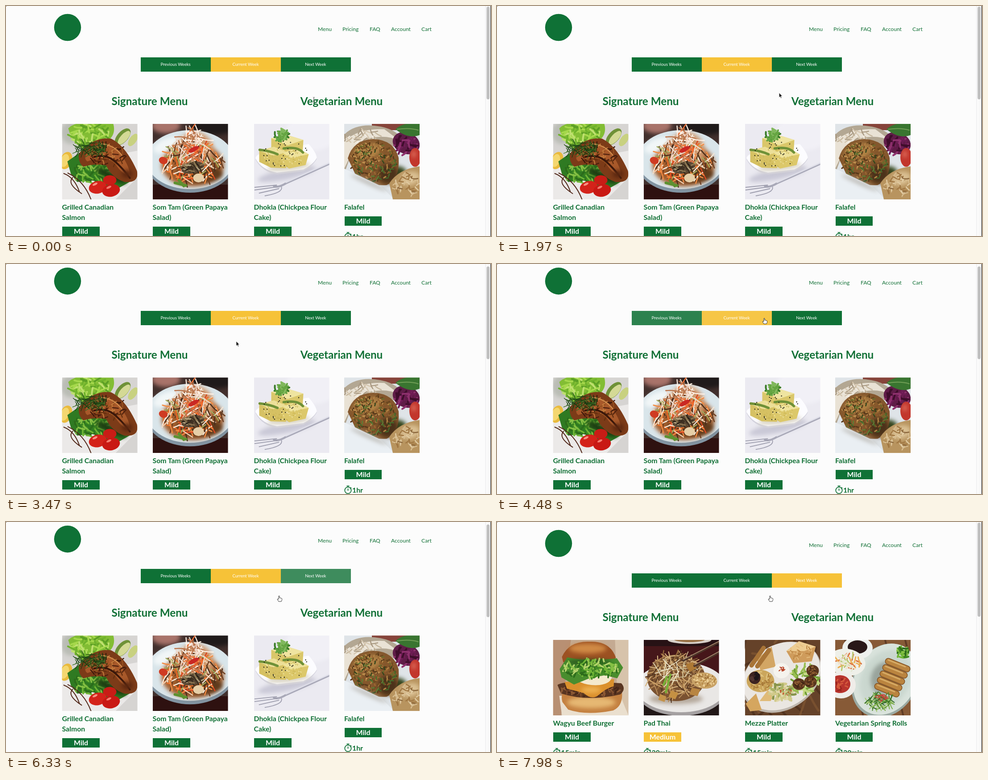
An HTML page for the animation above (8000 ms loop, 1087 by 515 pixels).

```html
<!DOCTYPE html>
<html lang="en">
<head>
<meta charset="utf-8">
<title>Weekly menu</title>
<style>
html, body { margin: 0; width: 100%; height: 100%; overflow: hidden; background: #fcfcfc; }
svg { display: block; }
rect { shape-rendering: crispEdges; }
text { font-family: Lato, sans-serif; fill: #0f6f34; }
.nav { font-size: 12.1px; }
.tab { font-size: 9.65px; fill: #fff; text-anchor: middle; }
.h2 { font-size: 24.25px; font-weight: 700; text-anchor: middle; }
.name { font-size: 15.8px; font-weight: 700; }
.level { font-size: 15.9px; font-weight: 700; fill: #fff; text-anchor: middle; }
.soft { filter: blur(5px); }
.photo { filter: blur(.45px); }
</style>
</head>
<body>
<svg id="stage" width="1087" height="515" viewBox="0 0 1087 515"></svg>
<script>
const GREEN = '#0f7136', YELLOW = '#f6c238';

let seed = 7;
const rnd = () => (seed = (seed * 16807) % 2147483647) / 2147483647;
const pick = list => list[Math.floor(rnd() * list.length)];

const rect = (x, y, w, h, fill) => `<rect x="${x}" y="${y}" width="${w}" height="${h}" fill="${fill}"/>`;
const oval = (x, y, rx, ry, fill, turn = 0) =>
  `<ellipse cx="${x}" cy="${y}" rx="${rx}" ry="${ry}" fill="${fill}" transform="rotate(${turn} ${x} ${y})"/>`;
const soft = (...args) => `<g class="soft">${oval(...args)}</g>`;
const shape = (d, fill) => `<path d="${d}" fill="${fill}"/>`;
const line = (d, color, width) =>
  `<path d="${d}" fill="none" stroke="${color}" stroke-width="${width}" stroke-linecap="round"/>`;
const label = (cls, x, y, s) => `<text class="${cls}" x="${x}" y="${y}">${s}</text>`;

// Curved strokes scattered inside an ellipse
function strands(n, x, y, rx, ry, colors, len, width) {
  let out = '';
  for (let i = 0; i < n; i++) {
    const a = rnd() * 6.283, r = Math.sqrt(rnd()), b = rnd() * 6.283;
    const dx = Math.cos(b) * len / 2, dy = Math.sin(b) * len / 2, bend = (rnd() - 0.5) * len * 0.6;
    const cx = x + Math.cos(a) * r * rx, cy = y + Math.sin(a) * r * ry;
    out += line(`M${(cx - dx).toFixed(1)} ${(cy - dy).toFixed(1)}q${(dx - dy / len * bend).toFixed(1)} ` +
      `${(dy + dx / len * bend).toFixed(1)} ${(2 * dx).toFixed(1)} ${(2 * dy).toFixed(1)}`, pick(colors), width);
  }
  return out;
}

const LEAF = ['#3f8a22', '#6fb536', '#2c6b1b', '#86c045'];
const CRUST = ['#8a5a2a', '#b08243', '#6d4a20', '#6c6a2c', '#9a6632', '#57391b'];

const photos = {
  salmon: () => rect(0, 0, 169, 169, '#d6d4d2') + shape('M0 92L0 169L120 169L169 120V60Z', '#ebe9e8') +
    soft(20, 20, 22, 25, '#b9bcb4') + shape('M14 10Q30-6 60 0H115Q122 25 100 40L60 60Q25 52 14 10Z', '#82bd34') +
    strands(50, 62, 25, 42, 24, ['#a6d84c', '#6fb22c', '#bfe070', '#5c9f25'], 16, 4) +
    oval(136, 29, 23, 12, '#6f9137', -48) + oval(139, 31, 19, 8, '#d4d995', -48) +
    oval(159, 36, 16, 8, '#c8d180', -55) + oval(9, 82, 13, 20, '#e9ba3c', 20) + oval(6, 82, 9, 15, '#f4d770', 20) +
    shape('M12 84L46 60L120 100L155 128L116 150L75 126L34 130L20 112Z', '#2f7a22') +
    strands(80, 74, 109, 50, 23, LEAF, 14, 3.5) + soft(110, 116, 38, 9, '#1c3b12', 25) +
    shape('M38 66Q70 28 110 33Q143 49 168 105Q174 133 140 130Q112 121 99 93Q72 88 48 96Q35 86 38 66Z', '#7c3b18') +
    shape('M69 50Q98 36 124 59Q153 92 152 117Q133 114 115 82Q91 70 57 84Q43 75 69 50Z', '#a8592a') +
    strands(45, 102, 70, 46, 24, ['#4d200e', '#bf773a', '#63300f', '#96501f', '#3c190b'], 13, 2.4) +
    line('M72 74Q100 66 121 86T152 121', '#3a170a', 4) + line('M82 45Q112 43 134 70', '#d08b4c', 2.5) +
    soft(146, 112, 12, 9, '#5a2710') +
    strands(60, 64, 57, 35, 16, ['#244f1a', '#3a6c24', '#183d12'], 20, 1.3) +
    line('M4 111Q28 120 39 152M13 110Q49 127 65 169M24 120Q10 134 44 156', '#52291b', 2) +
    oval(107, 126, 15, 11, '#c81d16') + oval(80, 142, 20, 14, '#d4231a', -12) + oval(110, 149, 20, 14, '#c91914', -12) +
    oval(74, 135, 6, 2.5, '#f79282', -25) + oval(105, 142, 6, 2.5, '#f47e70', -25),

  papaya: () => rect(0, 0, 169, 169, '#42302d') + soft(30, 4, 32, 17, '#a8736a') + soft(135, 8, 50, 17, '#1f1a1a') +
    rect(0, 136, 169, 33, '#2e1110') + oval(84, 86, 99, 68, '#8294a2') + oval(84, 80, 98, 66, '#d9e5ea') +
    soft(30, 48, 30, 14, '#f1f6f7', -25) + soft(90, 92, 70, 48, '#a4602f') + soft(95, 60, 42, 42, '#cf9a70') +
    soft(105, 112, 52, 20, '#5e3a1c') +
    strands(130, 88, 86, 66, 44, ['#ee6c25', '#f3e6d6', '#d94721', '#f0cdae', '#6f4124', '#f18a42', '#a0a95c', '#4c2e1c'], 27, 2.6) +
    strands(50, 88, 46, 34, 36, ['#fff1e5', '#f1d7ca', '#ef6d31', '#e9dccd', '#b9744c'], 34, 2.4) +
    oval(90, 98, 26, 13, '#5c4a36', -12) + strands(26, 90, 98, 22, 10, ['#3e3021', '#8c7751', '#b3a380', '#2a2118'], 12, 3) +
    oval(92, 57, 13, 5, '#c92824', -28) + oval(24, 82, 10, 8, '#cf3b23', 20) + oval(103, 121, 12, 10, '#e6cfa8') +
    line('M50 132L75 138M59 126L70 139', '#5d9130', 6),

  dhokla: () => rect(0, 0, 169, 169, '#ebeaf1') + soft(130, 20, 60, 40, '#f1f0f6') +
    soft(74, 112, 66, 12, '#c9c8d6', -12) +
    shape('M4 80Q2 74 18 66L123 47Q140 66 141 78Q134 92 111 106L52 113Q18 107 4 80Z', '#d3d2dd') +
    shape('M4 78Q2 72 18 64L123 45Q140 64 141 76Q134 90 111 102L52 109Q18 103 4 78Z', '#fcfcff') +
    soft(78, 96, 48, 8, '#d8d2c0', -6) +
    shape('M39 32L72 24L111 36L109 70L70 75L39 64Z', '#dac76a') + shape('M39 32L72 24L111 36L76 48Z', '#efe4a0') +
    shape('M12 60L45 51L76 64L72 99L38 98L12 85Z', '#d6c163') + shape('M12 60L45 51L76 64L42 71Z', '#ecdf98') +
    shape('M64 65L98 54L123 68L116 92L79 100L64 90Z', '#dcc86a') + shape('M64 65L98 54L123 68L83 76Z', '#efe39c') +
    strands(80, 66, 75, 48, 22, ['#c9b350', '#eee2a2', '#cdb95e'], 2.5, 1.6) +
    line('M13 58Q35 60 53 68M67 55Q98 50 110 64', '#6f9138', 5.5) +
    strands(32, 61, 25, 15, 13, ['#397b28', '#65a542', '#80b85c'], 9, 4) +
    strands(32, 68, 65, 52, 32, ['#2b2a1d'], 0.5, 2.2) +
    line('M170 89L72 133Q54 144 45 139', '#a9a9b8', 4.5) + line('M170 87L72 131', '#dedee8', 2.5) +
    line('M51 137L2 142M52 141L2 148M56 145L12 155M62 141Q66 154 25 161', '#9c9cac', 1.8),

  falafel: () => rect(0, 0, 169, 169, '#dfe4e8') + rect(62, 0, 107, 14, '#86443a') +
    shape('M0 24Q28-4 82 6Q123 14 135 43L111 51L70 33L28 46L10 84L0 111Z', '#b3a793') +
    shape('M0 40Q30 9 90 12L125 38Q85 19 36 39L17 65L0 100Z', '#e9e2d5') +
    strands(30, 42, 29, 44, 15, ['#d5c6af', '#f3ede2', '#a99982', '#c4b59c'], 15, 2.4) +
    oval(139, 43, 31, 24, '#5f1c47', 20) + strands(30, 140, 46, 25, 20, ['#8f316e', '#3f0d2b', '#6d1c54'], 16, 4) +
    shape('M115 12Q133-5 169 0V25Q144 35 115 12Z', '#397530') + line('M119 12Q147 8 166 14', '#72a057', 2) +
    oval(159, 75, 13, 21, '#c2362c') + soft(156, 68, 4, 8, '#e27a68') + soft(121, 108, 18, 13, '#35481f') +
    shape('M8 77Q20 35 66 34Q112 36 122 76Q125 124 95 137Q49 140 25 113Z', '#84572d') +
    soft(52, 62, 34, 17, '#ad8044', -15) + soft(98, 112, 22, 22, '#4b321a') +
    strands(230, 65, 84, 51, 45, CRUST, 5, 3) + strands(40, 71, 86, 46, 42, ['#426a2b', '#5d7c36', '#34471d'], 6, 2.6) +
    strands(40, 55, 70, 40, 28, ['#c99a58', '#bb8c4c'], 3, 2) +
    shape('M0 100Q47 122 82 139L112 169H0Z', '#eaeff3') + soft(55, 132, 45, 4, '#b9b7b2', 24) +
    shape('M101 133Q122 101 169 95V169H109Z', '#b8945f') + soft(148, 122, 22, 15, '#d9bf92', -15) +
    strands(45, 140, 138, 28, 27, ['#d7bc8f', '#a17844', '#e0caa2', '#8d693e'], 10, 2.6),

  burger: () => rect(0, 0, 169, 169, '#c4aa92') + shape('M0 0H40L18 169H0Z', '#b89073') + shape('M139 0H169V169H146Z', '#d7c3ab') +
    shape('M20 169L14 125L150 123L169 169Z', '#eadfce') +
    shape('M20 38Q36 2 82 4Q128 2 141 40L120 56Q81 61 23 50Z', '#9c5122') + soft(78, 19, 42, 11, '#d08a45') +
    shape('M21 139Q16 120 28 111L154 112Q159 147 135 158Q75 170 34 156Z', '#c48040') + soft(86, 140, 54, 13, '#e6b873') +
    shape('M10 101Q25 89 153 97Q165 110 151 122Q78 139 18 120Z', '#593521') +
    strands(75, 83, 112, 66, 13, ['#79482c', '#432417', '#8e5a35'], 7, 3) +
    shape('M26 94L137 88L136 104Q118 109 104 122Q88 137 69 119L31 109Z', '#db902c') + soft(85, 112, 22, 7, '#eeb252') +
    shape('M43 85Q85 66 132 80Q132 97 105 101Q80 103 62 95Z', '#f4e9cc') +
    shape('M15 65L32 39Q80 50 143 41L157 62L144 86L117 79L84 85L47 100L19 84Z', '#498d2e') +
    soft(80, 50, 50, 6, '#28531c') + strands(115, 85, 64, 63, 19, [...LEAF, '#b6d36e'], 11, 3.5),

  padThai: () => rect(0, 0, 169, 169, '#46171a') + rect(0, 0, 169, 14, '#271215') +
    oval(103, 0, 49, 9, '#d8d0c8') + oval(103, -2, 36, 7, '#997146') + rect(0, 138, 169, 31, '#211717') +
    oval(84, 112, 101, 58, '#a4a0a1') + oval(84, 106, 101, 56, '#e9e7e5') + soft(73, 132, 60, 12, '#b5a99c') +
    oval(73, 85, 65, 52, '#7a5231') +
    strands(165, 70, 80, 60, 46, ['#b58a59', '#7d5431', '#d6b581', '#9b703f', '#543621', '#cda368'], 30, 2.2) +
    strands(22, 60, 62, 46, 31, ['#e5ddbd', '#c9b98f', '#f0e9cd'], 33, 1.8) +
    oval(136, 91, 29, 18, '#c8a267', 5) + strands(90, 136, 91, 26, 15, ['#d9b776', '#b98b47', '#edcf96', '#9f723b'], 2, 3) +
    shape('M62 113L78 119L71 133L56 127Z', '#c59143') + shape('M94 55L110 50L119 64L103 71Z', '#ad7935') +
    shape('M108 107L127 111L121 126L103 122Z', '#b88542') + shape('M37 121L51 127L47 139L33 134Z', '#c49248') +
    line('M50 117L60 78M45 100L52 83', '#78ad37', 5) +
    line('M89 46L169 5M114 58L169 28', '#4d3529', 5) + line('M89 44L169 3M114 56L169 26', '#aa8c72', 1.5),

  mezze: () => rect(0, 0, 169, 169, '#654229') + strands(35, 85, 80, 105, 104, ['#78502f', '#51331f'], 45, 5) +
    oval(82, 84, 95, 72, '#bfb7ae', -32) + oval(82, 81, 92, 70, '#eae6e1', -32) +
    shape('M27 43L60 15L69 60L35 68Z', '#d3a664') + line('M15 57L42 18M28 59L54 23', '#a87437', 10) +
    shape('M93 25L121 3L159 15L150 48L109 52Z', '#cf9c5c') + shape('M93 25L121 3L159 15L133 25Z', '#edcc92') +
    strands(24, 126, 27, 24, 17, ['#b77e3c', '#e5bd7f'], 7, 2) +
    oval(35, 92, 31, 25, '#cba65c') + strands(55, 35, 92, 26, 21, ['#b98d45', '#e0c481', '#a77a39'], 6, 2.5) +
    oval(22, 85, 13, 14, '#3d2421') + strands(7, 22, 84, 9, 9, ['#523631', '#1f1719'], 3, 7) +
    shape('M2 143L25 120L38 157L12 160Z', '#d5a65f') + shape('M33 137L51 113L67 119L58 137Z', '#e0bb78') +
    oval(82, 69, 18, 17, '#f5f3ed') + strands(15, 82, 65, 7, 5, ['#b94428'], 3, 2) +
    strands(70, 85, 116, 29, 20, ['#d1ca8a', '#aab266', '#e0d8a9', '#87944b'], 9, 5) +
    strands(12, 91, 116, 15, 8, ['#c24d28'], 2, 2) +
    strands(60, 133, 88, 31, 30, ['#99be52', '#c6d983', '#719e35'], 15, 4) +
    [[152, 69], [121, 99], [147, 94]].map(([x, y]) =>
      oval(x, y, 14, 13, '#59351e') + strands(24, x, y, 11, 10, ['#7a4b27', '#402614', '#936235'], 3, 2.5)).join(''),

  rolls: () => rect(0, 0, 169, 169, '#875a37') +
    [20, 65, 110, 155].map(x => line(`M${x} -8L${x + 45} 180`, '#5e3b24', 4)).join('') +
    oval(112, 91, 71, 87, '#9baaa3', 32) + oval(113, 88, 68, 84, '#d9e3dc', 32) + soft(113, 88, 54, 69, '#cad7cf', 32) +
    oval(50, 18, 34, 25, '#edf0ed') + oval(50, 16, 22, 15, '#281818') +
    oval(26, 50, 42, 30, '#eff0e9', 10) + strands(40, 29, 49, 27, 16, ['#edae53', '#f0e2cd', '#b8c76f', '#db7240', '#e6e9d4'], 13, 3) +
    oval(13, 101, 33, 30, '#f0ede9') + oval(11, 99, 23, 20, '#b8342d') +
    strands(22, 11, 99, 17, 14, ['#d65b3c', '#9b251f'], 6, 3) +
    strands(30, 153, 29, 13, 12, LEAF, 9, 4) + soft(112, 86, 32, 38, '#99a49c', 20) +
    [0, 1, 2, 3, 4].map(i => {
      const x = 119 - i * 6, y = 48 + i * 14;
      const d = `M${x} ${y}L${x + 42} ${y + 17}`;
      return line(d, '#815022', 15) + line(d, '#ba843f', 12) + line(`M${x} ${y - 3}L${x + 38} ${y + 12}`, '#d5aa65', 3);
    }).join('') +
    strands(65, 102, 138, 29, 15, ['#51892d', '#7cad4b', '#a5c875', '#316a27'], 18, 2) +
    strands(14, 103, 130, 14, 8, ['#c5463b'], 8, 2)
};

const COLUMNS = [125.5, 328.5, 555.5, 758];

function stopwatch(x, y) {
  return `<g transform="translate(${x} ${y})" fill="none" stroke="${GREEN}" stroke-width="1.7">
    <circle cx="8.5" cy="10.5" r="7.2"/><path d="M5.5 1H11.5M8.5 1V4M8.5 6.5V11.5M14 4L16 6"/></g>`;
}

function dish(column, [photo, name, level, time]) {
  const x = COLUMNS[column], lines = name.split('|'), top = 448.3 + lines.length * 22.7;
  return `<svg x="${x}" y="264" width="169" height="169"><g class="photo">${photos[photo]()}</g></svg>` +
    lines.map((s, i) => label('name', x, 456 + i * 22.7, s)).join('') +
    rect(x + 0.7, top, 83.5, 20.8, level === 'Mild' ? GREEN : YELLOW) + label('level', x + 42.5, top + 16.2, level) +
    stopwatch(x, top + 35) + label('name', x + 18, top + 50.5, time);
}

const menus = [
  [['salmon', 'Grilled Canadian|Salmon', 'Mild', '30min'], ['papaya', 'Som Tam (Green Papaya|Salad)', 'Mild', '30min'],
    ['dhokla', 'Dhokla (Chickpea Flour|Cake)', 'Mild', '30min'], ['falafel', 'Falafel', 'Mild', '1hr']],
  [['burger', 'Wagyu Beef Burger', 'Mild', '15min'], ['padThai', 'Pad Thai', 'Medium', '20min'],
    ['mezze', 'Mezze Platter', 'Mild', '15min'], ['rolls', 'Vegetarian Spring Rolls', 'Mild', '20min']]
];
const nav = [['Menu', 699], ['Pricing', 754], ['FAQ', 815], ['Account', 863], ['Cart', 931]];
const tabs = ['Previous Weeks', 'Current Week', 'Next Week'];

const $ = id => document.getElementById(id);
$('stage').innerHTML = rect(0, 0, 1087, 515, '#fcfcfc') + '<g id="page">' +
  oval(138, 48, 30.2, 30.2, GREEN) +
  nav.map(([s, x]) => label('nav', x, 55.7, s)).join('') +
  tabs.map((s, i) => `<g id="tab${i}">${rect(302.3 + i * 156.8, 114.6, 156.8, 32.4, GREEN)}${label('tab', 380.2 + i * 156.8, 134.2, s)}</g>`).join('') +
  label('h2', 322, 222, 'Signature Menu') + label('h2', 752, 222, 'Vegetarian Menu') +
  menus.map((m, i) => `<g id="menu${i}">${m.map((d, c) => dish(c, d)).join('')}</g>`).join('') + '</g>' +
  rect(1074, 0, 12, 515, '#fafafa') + rect(1074, 0, 1, 515, '#e9e9ec') +
  '<rect id="thumb" x="1077" width="7" rx="3.5" fill="#c1c1c1" style="shape-rendering:auto"/>' +
  rect(1086, 0, 1, 515, '#000') + rect(0, 0, 1, 1, '#222') +
  `<g id="cursor">
    <path id="beam" d="M-2 -6Q0 -6 0 -4V4Q0 6 -2 6M2 -6Q0 -6 0 -4V4Q0 6 2 6" fill="none" stroke="#555" stroke-width=".8"/>
    <path id="arrow" d="M0 -5V5.5L2.4 3.3L4 7L5.6 6.3L4 2.7H7.2Z" fill="#111" stroke="#fff" stroke-width=".7"/>
    <path id="hand" d="M-2 1V-5Q-1 -6.7 0 -5V-1Q1.5 -2 2 -.7Q3.5 -1.3 4 0Q5.7 -.3 5.5 1.5V3.5L4 7H-2L-5 2Q-4.5 0 -2 2Z" fill="#fff" stroke="#222" stroke-width=".9"/>
  </g>`;

const SWAP = 6440;
// time, x, y
const path = [
  [0, 690, 210], [1670, 690, 210], [2450, 516, 178], [3500, 516, 178], [4120, 380, 127], [4250, 380, 127],
  [4480, 600, 127], [4950, 690, 124], [5880, 690, 124], [6250, 613, 171], [8000, 613, 171]
];
// tab hover start and end
const hovers = [[4000, 4370], [4370, 4530], [4530, SWAP]];

const clamp = v => Math.max(0, Math.min(1, v));
const ease = v => v * v * (3 - 2 * v);

function position(t) {
  const i = path.findIndex(p => p[0] > t), [t0, x0, y0] = path[i - 1], [t1, x1, y1] = path[i];
  const k = ease((t - t0) / (t1 - t0));
  return [x0 + (x1 - x0) * k, y0 + (y1 - y0) * k];
}

function draw(now) {
  const t = now % 8000, next = t >= SWAP ? 1 : 0;
  const scroll = next ? 0 : 9.8 * ease(clamp((t - 3300) / 130));
  $('page').setAttribute('transform', `translate(0 ${-scroll})`);
  $('thumb').setAttribute('y', 1.5 + scroll * 0.4);
  $('thumb').setAttribute('height', next ? 210.5 : 207.5);
  menus.forEach((m, i) => $('menu' + i).style.display = i === next ? '' : 'none');
  hovers.forEach(([a, b], i) => {
    const tab = $('tab' + i);
    const glow = next ? 0 : clamp((t - a) / 300) * (1 - clamp((t - b) / 300));
    tab.style.opacity = 1 - 0.2 * glow;
    tab.firstChild.setAttribute('fill', i === next + 1 ? YELLOW : GREEN);
  });
  const [x, y] = position(t);
  const kind = t >= 3900 ? 'hand' : t < 1750 ? 'beam' : 'arrow';
  $('cursor').setAttribute('transform', `translate(${x} ${y})`);
  for (const k of ['beam', 'arrow', 'hand']) $(k).style.display = k === kind ? '' : 'none';
  requestAnimationFrame(draw);
}
requestAnimationFrame(draw);
</script>
</body>
</html>
```
